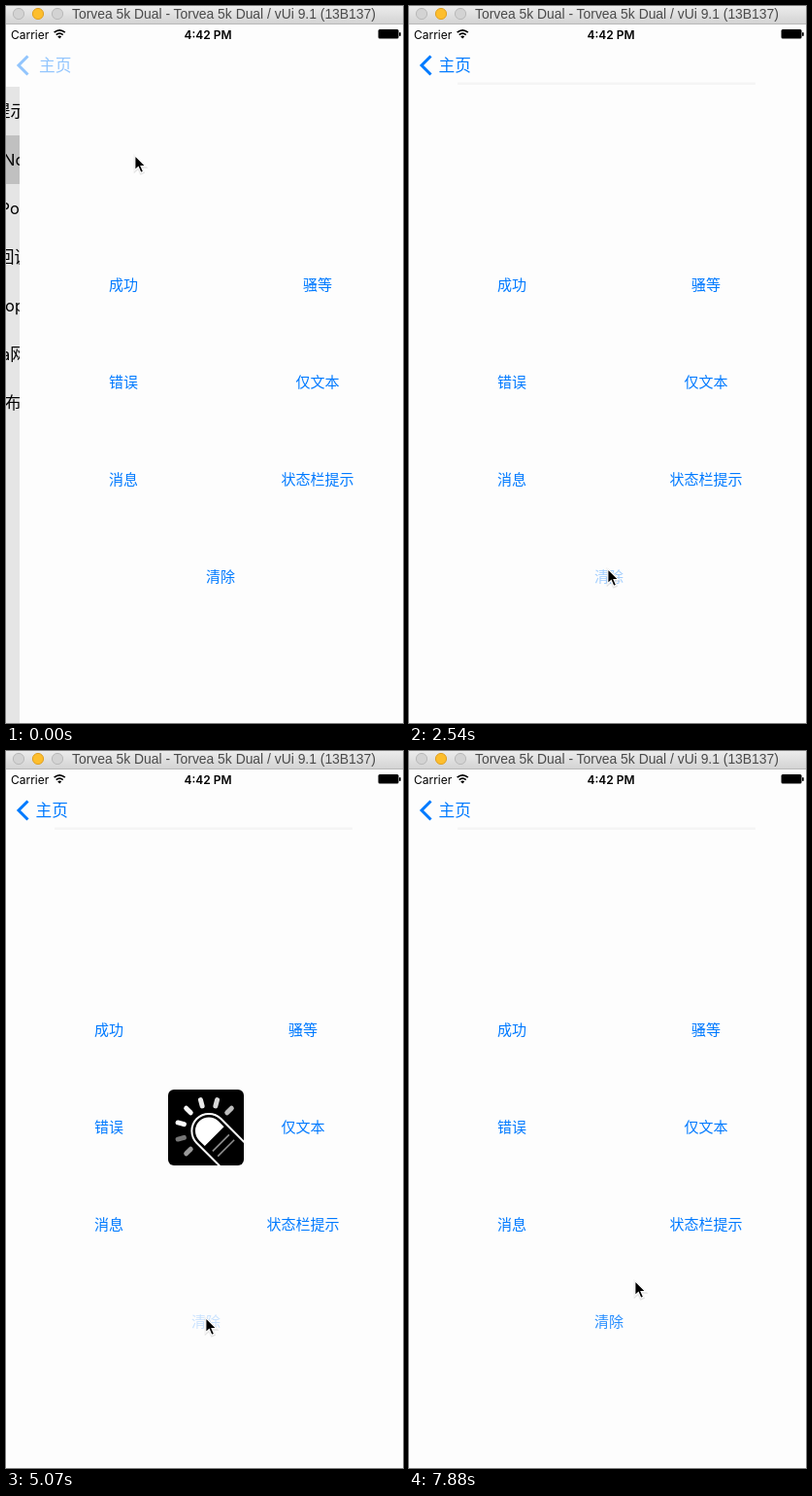
Animation, 409 px wide and 737 px high, one loop 8000 ms. Source, as an HTML page:

```html
<!DOCTYPE html>
<html lang="zh-CN">
<head>
<meta charset="utf-8">
<title>HUD demo</title>
<style>
html, body { margin: 0; width: 100%; height: 100%; overflow: hidden; background: #fdfdfd; }
svg { display: block; width: 100%; height: 100%; }
text { font-family: Inter, "Noto Sans CJK SC", "Noto Sans CJK", sans-serif; }
.cjk { font-family: "Noto Sans CJK SC", "Noto Sans CJK", sans-serif; }
.title { font: 13.88px "Liberation Sans", sans-serif; fill: #4a4a4a; }
.button { font-size: 15px; fill: #007aff; text-anchor: middle; }
.line { fill: none; stroke: #fff; }
</style>
</head>
<body>
<svg viewBox="0 0 409 737">
  <defs>
    <linearGradient id="chrome" x2="0" y2="1">
      <stop stop-color="#ececec"/><stop offset="1" stop-color="#d2d2d2"/>
    </linearGradient>
    <clipPath id="iconClip"><rect x="167" y="348" width="78" height="78" rx="6"/></clipPath>
  </defs>

  <g id="list">
    <rect y="83" width="40" height="654" fill="#e5e5e5"/>
    <rect y="133" width="40" height="50" fill="#c0c0c0"/>
  </g>
  <rect id="page" y="83" width="409" height="654" fill="#fdfdfd"/>
  <rect y="19" width="409" height="64" fill="#fdfdfd"/>
  <rect id="hairline" x="50" y="78.5" width="307" height="2.5" fill="#f5f5f5"/>

  <rect width="409" height="19" fill="url(#chrome)"/>
  <rect y="18" width="409" height="1" fill="#b8b8b8"/>
  <g stroke-width="1">
    <circle cx="13" cy="8" r="5.6" fill="#d3d3d3" stroke="#b9b9b9"/>
    <circle cx="33" cy="8" r="5.6" fill="#fdbe2d" stroke="#dfa023"/>
    <circle cx="53" cy="8" r="5.6" fill="#d3d3d3" stroke="#b9b9b9"/>
  </g>
  <text class="title" x="68" y="13">Torvea 5k Dual - Torvea 5k Dual / vUi 9.1 (13B137)</text>

  <text x="5" y="34" font-size="12">Carrier</text>
  <g fill="none" stroke="#000" stroke-width="1.7">
    <path d="M49.6 27.2Q55.2 22.4 60.8 27.2M51.7 29.6Q55.2 26.6 58.7 29.6"/>
    <path d="M55.2 33.6L53.2 31.4Q55.2 29.8 57.2 31.4Z" fill="#000" stroke="none"/>
  </g>
  <text x="208" y="34" font-size="12" font-weight="600" text-anchor="middle">4:42 PM</text>
  <rect x="383.5" y="24" width="21" height="9.5" rx="1.5"/>
  <rect x="405" y="27" width="1.7" height="4" rx=".8"/>

  <g id="back">
    <path d="M22.5 51.5L13 61L22.5 70.5" fill="none" stroke="#007aff" stroke-width="3"/>
    <text id="backText" class="cjk" y="67" font-size="16.7" fill="#007aff">主页</text>
  </g>
  <g id="buttons"></g>

  <g id="notice">
    <rect x="161" y="342" width="90" height="90" rx="10" fill="#4d4d4d"/>
    <circle class="line" cx="206" cy="375" r="17.6"/>
    <path id="mark" class="line"/>
    <text id="noticeText" class="cjk" x="186.5" y="415" font-size="13" fill="#fff"></text>
  </g>

  <g id="wait" clip-path="url(#iconClip)">
    <rect x="167" y="348" width="78" height="78"/>
    <g id="rays" stroke-width="5" stroke-linecap="round"></g>
    <g transform="translate(209 390.5) rotate(45)">
      <path class="line" stroke-width="2" d="M60 -17.6H0A17.6 17.6 0 0 0 0 17.6H60"/>
      <path fill="#fff" d="M8 -14H0A14 14 0 0 0 0 14H8Z"/>
      <path d="M17.5 -12V12M25 -12V12" stroke="#8c8c8c" stroke-width="1.6"/>
    </g>
  </g>

  <g id="cursor">
    <path d="M0 0V15.2L3.5 12L6.1 17.8L8.8 16.6L6.3 11H11Z" transform="translate(0 1)" fill="none" stroke="#000" stroke-opacity=".1" stroke-width="2.2"/>
    <path d="M0 0V15.2L3.5 12L6.1 17.8L8.8 16.6L6.3 11H11Z" stroke="#fff" stroke-width="1.2"/>
  </g>
</svg>
<script>
const LOOP = 8000, TICK = 148.8;
const $ = id => document.getElementById(id);

function add(parent, tag, attrs, text = '') {
  const el = document.createElementNS('http://www.w3.org/2000/svg', tag);
  for (const name in attrs) el.setAttribute(name, attrs[name]);
  el.textContent = text;
  return parent.appendChild(el);
}

[['提示', -12], ['Noti', -3], ['Pop', -6.5], ['回调', -8], ['op', -1], ['a网', -5], ['布', -1]]
  .forEach(([text, x], i) => add($('list'), 'text', { x, y: 114 + 50 * i, 'font-size': 16.5 }, text));

// label, centre, then [press, release] ticks
const buttons = [
  ['成功', 106, 287, [8, 9]],
  ['骚等', 306, 287, [23, 25]],
  ['错误', 106, 387, [40, 41]],
  ['仅文本', 306, 387],
  ['消息', 106, 487],
  ['状态栏提示', 306, 487],
  ['清除', 206, 587, [16, 17], [34, 36], [50, 51]]
].map(([label, x, y, ...taps]) => ({
  taps, el: add($('buttons'), 'text', { x, y: y + 5, class: 'button cjk' }, label)
}));

const rays = Array.from({ length: 7 }, (_, i) => add($('rays'), 'path', {
  d: 'M26.5 0H33', transform: `translate(209 390.5) rotate(${135 + 30 * i})`
}));
const glow = [255, 246, 234, 216, 188, 154, 118];

const notices = [
  { from: 9, to: 17, text: '成功！', mark: 'M198 376.5L203.5 381.5L214.5 370' },
  { from: 41, to: 51, text: '错误！', mark: 'M198 367L214 383M214 367L198 383' }
];
const waiting = { from: 25, to: 36 };
const active = (span, k) => k >= span.from && k < span.to;

// cursor stops: tick, x, y
const stops = [
  [0, 133, 154], [7, 109, 284], [10, 109, 284], [14, 200, 541], [15, 204, 577],
  [17, 205, 579], [22, 308, 287], [24, 309, 284], [25, 310, 282], [27, 331, 245],
  [30, 314.5, 513], [33, 206, 583], [35, 206, 583], [38, 156, 522], [40, 108, 383],
  [43, 108, 384], [45, 118, 399], [46, 163, 455], [48, 206, 585], [51, 206, 586], [53, 233, 545]
];

function cursorAt(k) {
  const i = Math.max(1, stops.findIndex(s => s[0] >= k));
  const [k0, x0, y0] = stops[i - 1], [k1, x1, y1] = stops[i];
  const p = (k - k0) / (k1 - k0), e = p * p * (3 - 2 * p);
  return [x0 + (x1 - x0) * e, y0 + (y1 - y0) * e];
}

function tapAlpha(taps, k) {
  const tap = taps.filter(t => t[0] <= k).pop();
  if (!tap) return 1;
  return k < tap[1] ? 0.2 : Math.min(1, 0.35 + 0.25 * (k - tap[1]));
}

const show = (el, on) => el.setAttribute('display', on ? 'inline' : 'none');
const move = (el, x, y = 0) => el.setAttribute('transform', `translate(${x} ${y})`);

function render(t) {
  const k = Math.min(53, Math.floor((t + 9) / TICK));

  const slide = 0.2 ** k;
  move($('page'), 14 * slide);
  move($('buttons'), 15 * slide);
  show($('list'), k < 3);
  show($('hairline'), k > 0);
  $('back').setAttribute('opacity', 1 - 0.58 * slide);
  $('backText').setAttribute('x', 30.5 + 3.5 * slide);

  for (const b of buttons) b.el.setAttribute('opacity', tapAlpha(b.taps, k));

  const notice = notices.find(n => active(n, k));
  show($('notice'), notice);
  if (notice) {
    $('mark').setAttribute('d', notice.mark);
    $('noticeText').textContent = notice.text;
  }

  show($('wait'), active(waiting, k));
  rays.forEach((ray, i) => {
    const v = glow[(i + 3 * (k + 5)) % 7];
    ray.setAttribute('stroke', `rgb(${v},${v},${v})`);
  });

  const [x, y] = cursorAt(k);
  move($('cursor'), x - 0.2, y - 0.4);
}

const start = performance.now();
function frame() {
  render((performance.now() - start) % LOOP);
  requestAnimationFrame(frame);
}
frame();
</script>
</body>
</html>
```
